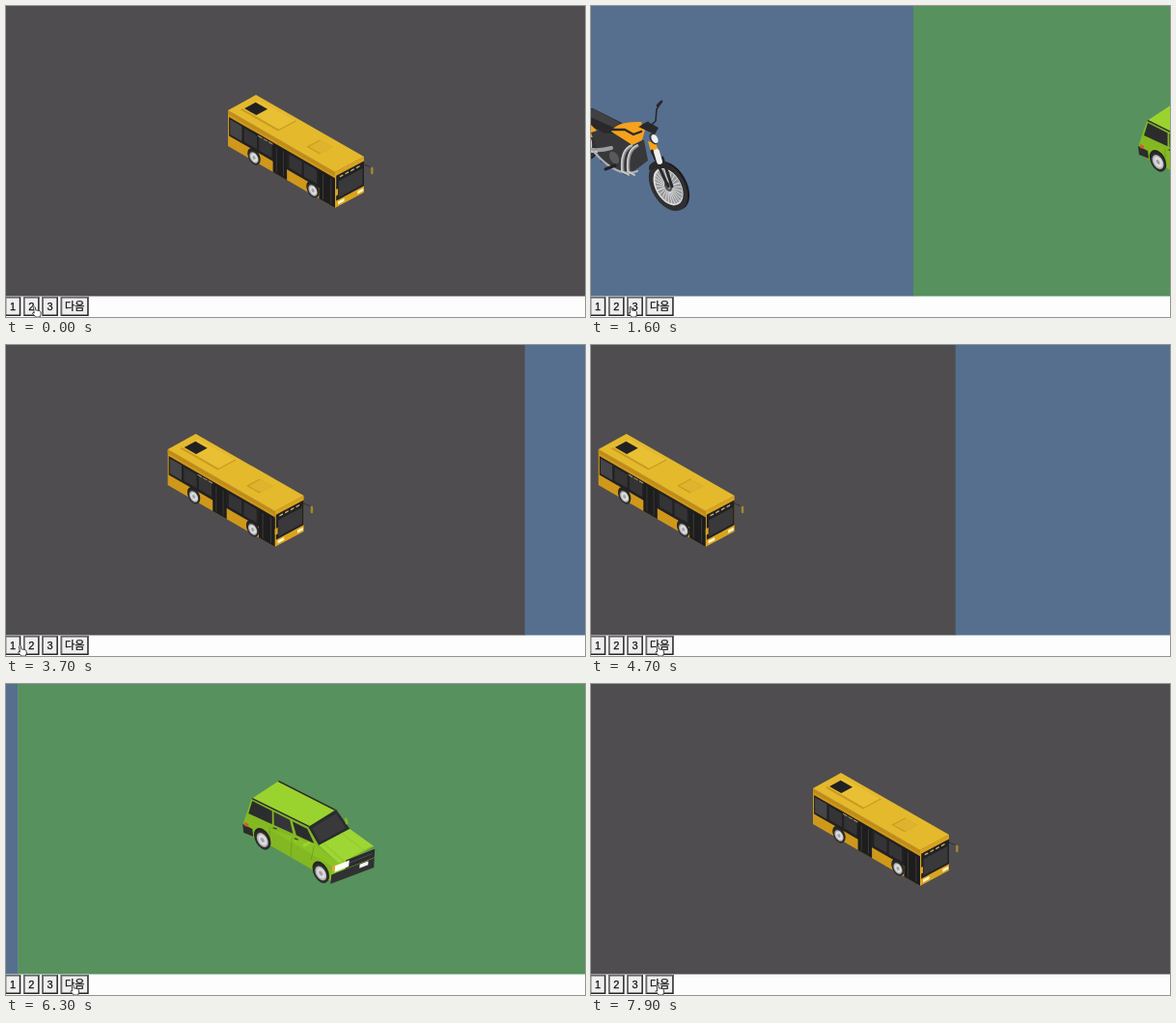
An HTML page for the animation above (8 s loop, 600 by 322 pixels).

```html
<!DOCTYPE html>
<html lang="ko">
<head>
<meta charset="utf-8">
<title>Slider</title>
<style>
html, body { margin: 0; width: 100%; height: 100%; overflow: hidden; background: #fefdfe; }
svg { display: block; width: 600px; height: 322px; }
text { font: 11px "Liberation Sans", "Noto Sans CJK KR", "Noto Sans CJK", sans-serif; text-anchor: middle; fill: #111; stroke: #111; stroke-width: .25; }
</style>
</head>
<body>
<svg viewBox="0 0 600 322">
  <clipPath id="view"><rect width="600" height="300.5"/></clipPath>
  <g clip-path="url(#view)"><g id="strip"></g></g>
  <g id="buttons"></g>
  <path id="hand" d="M0 1Q1-1 2 1L2.4 4.2 7 5 8.2 6.5V9L7.2 12H2.3L-1 8Q-1 6 .8 7.6Z" fill="#fff" stroke="#222" stroke-width=".9" stroke-linejoin="round"/>
</svg>
<script>
const byId = id => document.getElementById(id);
const mix = (a, b, k) => a + (b - a) * k;
const range = n => [...Array(n).keys()];
const poly = (fill, points) => `<polygon points="${points}" fill="${fill}"/>`;
const shape = (fill, d) => `<path d="${d}" fill="${fill}"/>`;
const line = (color, width, d) =>
  `<path d="${d}" fill="none" stroke="${color}" stroke-width="${width}" stroke-linecap="round" stroke-linejoin="round"/>`;

// Four corners, clockwise; the result paints a box given in shares of that face
function face(a, b, c, d) {
  const at = (s, t) => [0, 1].map(i => mix(mix(a[i], b[i], s), mix(d[i], c[i], s), t).toFixed(1));
  return (fill, s0 = 0, s1 = 1, t0 = 0, t1 = 1) =>
    poly(fill, [at(s0, t0), at(s1, t0), at(s1, t1), at(s0, t1)].join(" "));
}

// Circle lying in the vertical plane of the vehicles' near side
const disc = (x, y, r, fill) =>
  `<ellipse cx="${x}" cy="${y}" rx="${r}" ry="${r * 0.62}" transform="rotate(60 ${x} ${y})" fill="${fill}"/>`;

const wheel = (x, y, r) =>
  disc(x, y - 1.5, r * 1.08, "#222") + disc(x, y, r, "#2d2d2d") +
  disc(x, y, r * 0.74, "#b4b4b4") + disc(x + 0.3, y, r * 0.56, "#dcdcdc") + disc(x, y, r * 0.25, "#a2a2a2");

const spokedWheel = (x, y, r) =>
  disc(x + 2, y - 1, r, "#1b1b1d") + disc(x, y, r, "#303032") +
  disc(x, y, r * 0.77, "#dedede") + disc(x + 0.5, y, r * 0.7, "#96989b") +
  `<g transform="translate(${x} ${y}) rotate(60) scale(1 .62)">` + range(26).map(i =>
    `<path d="M0 0H${r * 0.72}" transform="rotate(${i * 360 / 26})" stroke="#e6e6e6" stroke-width=".9"/>`).join("") + "</g>" +
  disc(x, y, r * 0.2, "#55565a") + disc(x, y, r * 0.1, "#aaa");

function drawBus() {
  const rearTop = [230, 108], frontTop = [341, 172], farTop = [371, 156];
  const rearLow = [230, 145], frontLow = [341, 209], farLow = [371, 193];
  const roof = face([259, 92], farTop, frontTop, rearTop);
  const side = face(rearTop, frontTop, frontLow, rearLow);
  const front = face(frontTop, farTop, farLow, frontLow);
  const dark = "#222122", glass = "#343335", gold = "#c99a20";
  const door = (s0, s1) => side("#1e1d1e", s0, s1, 0.2) +
    range(2).map(i => side("#3b3a3b", mix(s0, s1, i / 2 + 0.22), mix(s0, s1, i / 2 + 0.28), 0.25, 0.95)).join("");
  return [
    side("#cf981b"), front("#dba41f"), roof("#e5b92c"),
    roof(gold, 0.05, 0.4, 0.1, 0.75), roof("#e9bf34", 0.05, 0.39, 0.1, 0.68),
    roof(dark, 0.06, 0.17, 0.24, 0.64),
    roof(gold, 0.66, 0.78, 0.26, 0.72), roof("#dfb32d", 0.67, 0.78, 0.26, 0.68),
    side("#c08b18", 0, 1, 0.02, 0.1), side(dark, 0.01, 1, 0.17, 0.7),
    side("#454446", 0.02, 0.13, 0.22, 0.64),
    ...range(5).map(i => side(glass, 0.15 + i * 0.14, 0.27 + i * 0.14, 0.24, 0.62)),
    ...range(3).map(i => side("#b9a468", 0.28 + i * 0.05, 0.32 + i * 0.05, 0.21, 0.24)),
    door(0.42, 0.55), door(0.85, 1),
    wheel(257, 157, 8.5), wheel(318, 191, 8.5),
    front(dark, 0.04, 1, 0.12, 0.82), front("#39383a", 0.12, 0.95, 0.3, 0.76),
    ...range(4).map(i => front("#c9b478", 0.16 + i * 0.19, 0.28 + i * 0.19, 0.18, 0.22)),
    front("#fff5cd", 0.1, 0.32, 0.87, 0.95), front("#fff5cd", 0.78, 0.97, 0.87, 0.95),
    front("#dba41f", 0, 0.1, 0.5, 0.68),
    line("#2a292a", 0.8, "M371 164L377 166.5"), line("#a9862b", 2.4, "M379.3 168V173")
  ].join("");
}

function drawBike() {
  const dark = "#29292b", orange = "#f6a21e";
  return [
    spokedWheel(54, 137, 25),
    shape(orange, "M37 120Q38 109 58 106L72 121V136H66Q60 121 37 120Z"),
    line(dark, 3, "M43 112L48 114M56 105L58 107"),
    poly("#38383a", "67,131 84,126 122,139 126,160 105,176 77,161"),
    line("#9b9da0", 4, "M37 134Q60 155 88 147"),
    line("#c6c8ca", 2, "M36 132Q56 152 73 151"),
    line("#aeb0b2", 2.2, "M70 151Q95 179 115 171"),
    disc(91, 157, 7, "#59595b"),
    ...range(2).map(i => `<g transform="translate(${i * 6} 1)">` +
      line("#88898c", 3, "M109 144Q98 149 100 170") + line("#cacbcc", 1.8, "M109 143Q97 148 99 170L106 174") + "</g>"),
    line("#222224", 3, "M82 169L92 165"),
    shape(dark, "M57 113Q61 105 69 106L99 121 93 132H82L71 127Z"),
    shape("#414143", "M60 112Q64 106 70 107L97 121 91 126Z"),
    shape(orange, "M88 130Q93 119 119 120L123 128 120 139 110 144Z"),
    line(dark, 2.4, "M89 128H102L111 133 119 130"),
    poly(dark, "116,125 128,121 137,126 133,133"),
    line(dark, 1.6, "M128 125L134 119 135 107 140 99M136 103L140 99"),
    line(dark, 2.8, "M136 103L140 99M120 124L126 121"),
    poly(orange, "126,140 134,142 138,152 129,151"),
    spokedWheel(147, 187, 27.5),
    line(dark, 3, "M130 150L147 187M141 157L151 187"),
    shape(dark, "M127 166Q134 156 147 163L158 177Q144 163 127 170Z"),
    line("#f0f0ee", 6, "M135 151L138 161"),
    disc(132, 137.5, 6.2, "#333436"), disc(133, 137.5, 5, "#eef1f3")
  ].join("");
}

function drawCar() {
  const nearRear = [388, 119], farRear = [417, 100], farFront = [476, 130], nearFront = [447, 148];
  const hoodNear = [458, 167], hoodFar = [490, 150], noseNear = [480, 187], noseFar = [515, 168];
  const roof = face(farRear, farFront, nearFront, nearRear);
  const panes = face([389, 121], [446, 150], [453, 165], [385, 134]);
  const shield = face(nearFront, farFront, hoodFar, hoodNear);
  const hood = face(hoodNear, hoodFar, noseFar, noseNear);
  const nose = face([472, 188], [516, 170], [515, 190], [470, 207]);
  const dark = "#2b2c2e", lime = "#9bd32e", shade = "#83b822";
  return [
    poly(shade, "380,143 388,119 447,148 458,167 480,187 470,204 449,191 409,168 380,154"),
    poly("#8ac326", "381,142 453,165 480,187 474,190 410,152"),
    poly(dark, "379,145 389,150 390,158 380,154"),
    poly("#d65a2b", "381,143 385,145 385,148 381,147"),
    roof(lime), roof(dark, 0, 1, 0, 0.06), roof(dark, 0, 1, 0.95),
    panes(dark, 0, 0.36), panes("#343538", 0.39, 0.68), panes(dark, 0.73, 1),
    line("#6b971d", 0.7, "M407 149V162M430 159L429 179M453 168L450 182"),
    line(dark, 1.3, "M411 149L414 150M433 160L436 161"),
    shield(dark), shield("#39393b", 0.08, 0.92, 0.14, 0.88),
    hood("#9ed733"), hood("#93ca2c", 0.12, 0.16), hood("#93ca2c", 0.72, 0.75), hood(shade, 0, 1, 0.96),
    nose("#8fc629", 0, 1, 0, 0.5), nose(dark, 0.32, 1, 0.02, 0.48),
    nose("#56585a", 0.4, 0.95, 0.22, 0.26),
    nose("#e8a331", 0, 0.07, 0.03, 0.3), nose("#fcfff3", 0.07, 0.4, 0.08, 0.42),
    nose("#303132", 0, 1, 0.5, 1), nose("#f4f4ef", 0.66, 0.86, 0.54, 0.74),
    line(lime, 3.5, "M443 167L447 165"), line(shade, 3, "M486 140L487 144"),
    wheel(399.5, 161.5, 11), wheel(460, 196, 11)
  ].join("");
}

const panels = [["#4f4d4f", 0, drawBus()], ["#566f8f", 199, drawBike()], ["#56915e", -146, drawCar()]];
byId("strip").innerHTML = panels.map(([fill, dx, art], i) =>
  `<g transform="translate(${i * 600})"><rect width="600.5" height="301" fill="${fill}"/><g transform="translate(${dx})">${art}</g></g>`
).join("");

const labels = ["1", "2", "3", "다음"];
byId("buttons").innerHTML = labels.map((label, i) => {
  const x = i * 19.3 - 1.2, w = label.length > 1 ? 29 : 16.5;
  return `<rect x="${x}" y="301" width="${w}" height="20" fill="#242424"/>` +
    `<path d="M${x} 321V301H${x + w}l-1.5 1.5H${x + 1.5}V319.5Z" fill="#686868"/>` +
    `<rect x="${x + 1.5}" y="302.5" width="${w - 3}" height="17" fill="#efefef"/>` +
    `<text x="${x + w / 2}" y="315">${label}</text>`;
}).join("");

// Each click: time and the panel it leads to
const clicks = [[150, 1], [1335, 2], [2984, 0], [4468, 1], [5485, 2], [6518, 0]];
// Pointer trips: start, end, x it reaches
const trips = [[600, 1150, 40], [1850, 2750, 3.5], [3500, 4300, 68]];

// CSS "ease": cubic-bezier(.25, .1, .25, 1)
function ease(x) {
  if (x <= 0) return 0;
  if (x >= 1) return 1;
  let lo = 0, hi = 1, s;
  for (let i = 0; i < 24; i++) {
    s = (lo + hi) / 2;
    if (0.75 * s * (1 - s) + s ** 3 < x) lo = s; else hi = s;
  }
  return 0.3 * s * (1 - s) ** 2 + 3 * s * s * (1 - s) + s ** 3;
}

function draw(t) {
  let panel = 0, x = 28.5;
  for (const [start, next] of clicks) panel = mix(panel, next, ease((t - start) / 1000));
  for (const [start, end, to] of trips) {
    const k = Math.min(1, Math.max(0, (t - start) / (end - start)));
    x = mix(x, to, k * k * (3 - 2 * k));
  }
  byId("strip").setAttribute("transform", `translate(${-600 * panel})`);
  byId("hand").setAttribute("transform", `translate(${x} 311) scale(.92)`);
}

const begin = performance.now();
function tick() {
  draw((performance.now() - begin) % 8000);
  requestAnimationFrame(tick);
}
tick();
</script>
</body>
</html>
```
